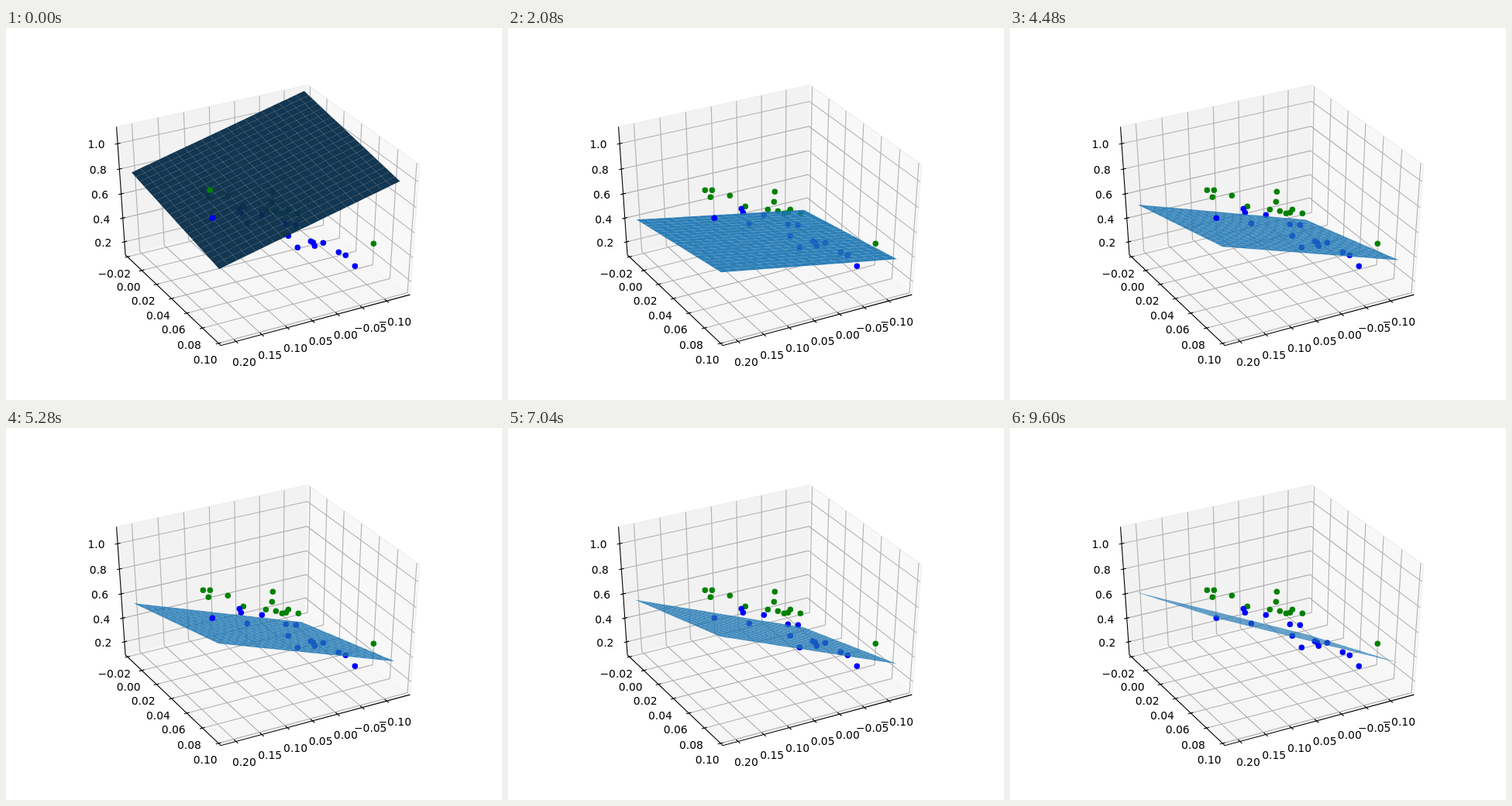
Write an HTML page with a canvas that moves like this. It is 640 px wide and 480 px high and loops after 9760 ms.

```html
<!DOCTYPE html>
<html lang="en">
<head>
<meta charset="utf-8">
<title>Plane fit</title>
<style>
  html, body { margin: 0; width: 100%; height: 100%; overflow: hidden; background: #fff; }
  canvas { display: block; }
</style>
</head>
<body>
<canvas id="stage" width="640" height="480"></canvas>
<script>
const ctx = document.getElementById('stage').getContext('2d');
const STEP = 160, LOOP = 9760, CELLS = 20;
const HALF = .5208;               // half the side of the box
const DEG = Math.PI / 180;
const turn = 28.5 * DEG, tilt = 37 * DEG, distance = 10;

// Measured points, in stage pixels.
const green = [[254, 209], [263, 209], [261, 218], [286, 216], [306, 230], [344, 211], [343, 224],
  [335, 234], [348, 236], [356, 239], [361, 238], [364, 234], [377, 239], [474, 278]];
const blue = [[266, 245], [301, 233], [303, 238], [311, 252], [330, 241], [361, 253], [374, 254],
  [364, 268], [376, 283], [393, 275], [396, 276.5], [398, 281], [409, 277], [429, 289], [438, 293], [450, 307]];

// Fitted plane over time: middle height, rise along each floor axis.
const fits = [
  { t: 0, mid: .284, rise: [.334, .154] },
  { t: 160, mid: .4, rise: [.36, .16] },
  { t: 960, mid: -.317, rise: [-.151, -.179] },
  { t: 2080, mid: -.218, rise: [-.26, -.203] },
  { t: 4480, mid: -.161, rise: [-.469, -.28] },
  { t: 8000, mid: -.154, rise: [-.617, -.333] },
  { t: 9600, mid: -.121, rise: [-.697, -.386] }
];

const mix = (a, b, k) => a + (b - a) * k;
const range = n => Array.from({ length: n }, (_, i) => i);

// Perspective view: a runs right, b runs back to the left, z runs up.
function project(a, b, z) {
  const side = a * Math.cos(turn) - b * Math.sin(turn);
  const away = a * Math.sin(turn) + b * Math.cos(turn);
  const up = away * Math.sin(tilt) + z * Math.cos(tilt);
  const depth = distance + away * Math.cos(tilt) - z * Math.sin(tilt);
  return [334.7 + 2681 * side / depth, 237.4 - 1998 * up / depth];
}

function trace(points) {
  ctx.beginPath();
  points.forEach(p => ctx.lineTo(...project(...p)));
}
function fill(color, ...points) {
  ctx.fillStyle = color;
  trace(points);
  ctx.fill();
}
function line(color, ...points) {
  ctx.strokeStyle = color;
  ctx.lineWidth = 1.11;
  trace(points);
  ctx.stroke();
}
function label(value, digits, point, dx, dy) {
  const [x, y] = project(...point);
  ctx.fillStyle = '#000';
  ctx.fillText(value.toFixed(digits).replace('-', '\u2212'), x + dx, y + dy + 5);
}
function dot(color, [x, y]) {
  ctx.fillStyle = color;
  ctx.beginPath();
  ctx.arc(x + .3, y + .3, 3.75, 0, 7);
  ctx.fill();
}

function drawAxes() {
  const h = HALF, grid = '#b0b0b0';
  const left = [-h, h, -h], back = [h, h, -h], right = [h, -h, -h], front = [-h, -h, -h];
  const top = ([a, b]) => [a, b, h];
  fill('#f8f8f8', back, right, top(right), top(back));
  fill('#f2f2f2', left, back, top(back), top(left));
  fill('#f6f6f6', left, back, right, front);
  line('#ededed', top(left), top(back), top(right), right);

  const ticks = [
    ...range(7).map(i => {
      const value = .2 - i * .05, a = -.44 + i * .138;
      return { value, digits: 2, at: [a, -h, -h], path: [[a, h, -h], [a, h, h]], dir: [0, .02], shift: [10.5, 26.5] };
    }),
    ...range(7).map(i => {
      const value = .1 - i * .02, b = -.497 + i * .1656;
      return { value, digits: 2, at: [-h, b, -h], path: [[h, b, -h], [h, b, h]], dir: [.014, 0], shift: [-17, 21.5] };
    }),
    ...range(5).map(i => {
      const value = 1 - i * .2, z = value - .609;
      return { value, digits: 1, at: [-h, h, z], path: [[h, h, z], [h, -h, z]], dir: [.014, 0], shift: [-27.5, 1.2] };
    })
  ];

  ticks.forEach(k => line(grid, k.at, ...k.path));
  line('#000', top(left), left, front, right);
  ctx.font = '13.89px "DejaVu Sans", sans-serif';
  ctx.textAlign = 'center';
  ticks.forEach(({ value, digits, at: [a, b, z], dir: [da, db], shift }) => {
    line('#000', [a - da, b - db, z], [a + da, b + db, z]);
    label(value, digits, [a, b, z], ...shift);
  });
}

function fitAt(t) {
  const next = Math.max(1, fits.findIndex(f => f.t >= t));
  const p = fits[next - 1], q = fits[next], k = (t - p.t) / (q.t - p.t);
  return { mid: mix(p.mid, q.mid, k), rise: p.rise.map((r, i) => mix(r, q.rise[i], k)) };
}

// Translucent cells; their soft edges leave the fine seams.
function drawPlane(t) {
  const { mid, rise } = fitAt(t);
  const alpha = Math.max(.88, .97 - t / 50000);
  const color = t < 480 ? `rgba(11,48,75,${alpha})` : `rgba(28,117,179,${alpha})`;
  const at = (i, j) => {
    const u = i / CELLS - .5, v = j / CELLS - .5;
    return [.95 * u - .012, .91 * v, mid + rise[0] * u + rise[1] * v];
  };
  for (const i of range(CELLS))
    for (const j of range(CELLS))
      fill(color, at(i, j), at(i + 1, j), at(i + 1, j + 1), at(i, j + 1));
}

function draw(t) {
  ctx.fillStyle = '#fff';
  ctx.fillRect(0, 0, 640, 480);
  drawAxes();
  green.forEach(p => dot('#008000', p));
  blue.forEach(p => dot('#00f', p));
  drawPlane(t);
  // Two points lie nearer than the plane at first.
  if (t < 480) dot('#008000', green[1]);
  if (t < 5400) dot('#00f', blue[0]);
}

const start = performance.now();
let shown = -1;
function loop() {
  const t = Math.floor(((performance.now() - start) % LOOP) / STEP) * STEP;
  if (t !== shown) draw(shown = t);
  requestAnimationFrame(loop);
}
loop();
</script>
</body>
</html>
```
